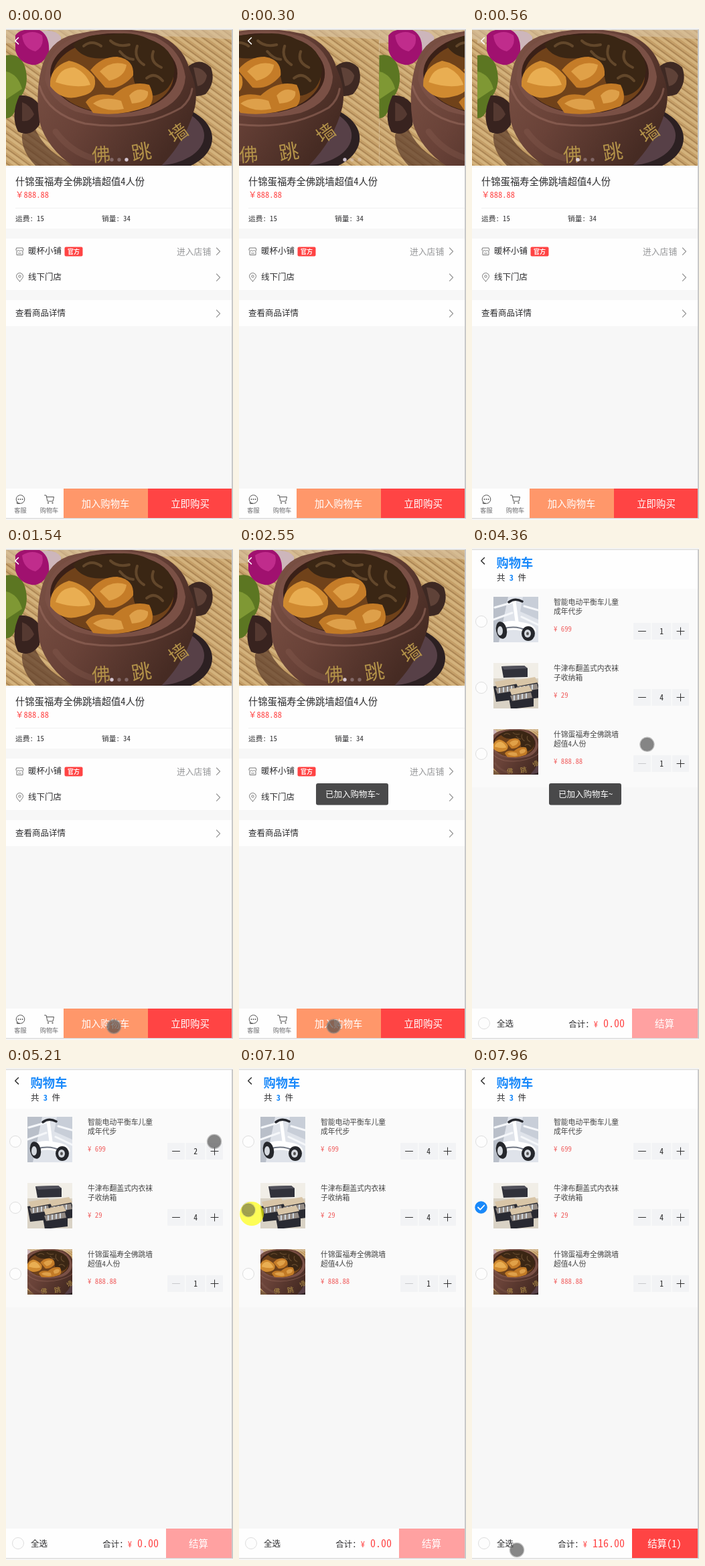
Recreate the animation shown at these times as an HTML page. Size 339 by 736 pixels, loop 8 s.

```html
<!DOCTYPE html>
<html lang="zh-CN">
<head>
<meta charset="utf-8">
<title>Shop</title>
<style>
html, body { margin: 0; width: 100%; height: 100%; overflow: hidden; background: #f7f7f7; }
svg { display: block; }
#stage { width: 100vw; height: 100vh; }
text { font-family: "Noto Sans Mono CJK SC", "Noto Sans CJK SC", "Noto Sans CJK", sans-serif; white-space: pre; }
</style>
</head>
<body>
<svg id="stage" viewBox="0 0 339 736" xmlns="http://www.w3.org/2000/svg"></svg>
<script>
const LOOP = 8000;
const RED = '#ff4444', BLUE = '#1989fa', INK = '#2c2c2e';

// Markup helpers; text is placed by its vertical centre.
const rect = (x, y, w, h, fill, more = '') =>
  `<rect x="${x}" y="${y}" width="${w}" height="${h}" fill="${fill}" ${more}/>`;
const oval = (x, y, rx, ry, fill, more = '') =>
  `<ellipse cx="${x}" cy="${y}" rx="${rx}" ry="${ry}" fill="${fill}" ${more}/>`;
const path = (d, fill, more = '') => `<path d="${d}" fill="${fill}" ${more}/>`;
const line = (d, color, width = 1, more = '') =>
  `<path d="${d}" fill="none" stroke="${color}" stroke-width="${width}" stroke-linecap="round" stroke-linejoin="round" ${more}/>`;
const label = (x, cy, size, fill, str, more = '') =>
  `<text x="${x}" y="${cy + size * 0.38}" font-size="${size}" fill="${fill}" ${more}>${str}</text>`;
const mid = 'text-anchor="middle"';
const chevron = y => line(`M314.5 ${y - 5}l5 5.2l-5 5.2`, '#9b9b9b', 1.3);
const back = color => line('M18.5 14.5l-4.8 4.7l4.8 4.7', color, 1.5);
const tick = (x, y) => `<circle cx="${x}" cy="${y}" r="8.5" fill="#fdfdfd" stroke="#dedede"/>`;

const potArt = () => `
  ${rect(0, 0, 337, 203, '#c59f68')}${rect(0, 0, 337, 203, 'url(#mat)')}
  ${path('M0 0H337V14Q180 2 0 20Z', '#d9c4a4', 'opacity=".6"')}
  ${path('M40 140Q60 190 110 203H44Q22 180 24 156Z', '#5a3a28', 'opacity=".7"')}
  ${path('M0 38Q20 34 28 54Q36 80 22 100Q12 134 0 132Z', '#5c7622')}
  ${path('M0 62Q18 66 24 88L0 104Z', '#7f9834')}
  ${path('M48 2Q74 -2 82 10Q84 32 70 42Q54 26 48 2Z', '#cdb6bb')}
  ${path('M14 8Q22 -4 50 0Q66 8 64 34Q54 54 38 52Q18 48 14 30Z', '#a0116f')}
  ${path('M24 8Q40 -2 54 8Q58 24 44 32Q26 28 24 8Z', '#c02c8c')}
  ${oval(225, 162, 83, 52, '#2c2022')}${oval(222, 158, 74, 45, '#574047')}
  ${path('M20 98Q38 96 50 112V142Q36 162 18 152Q6 128 20 98Z', '#38231f')}
  ${path('M24 108q12 4 18 18q-6 12-18 10z', '#553931')}
  ${path('M268 58Q288 38 306 56Q314 78 298 96Q278 104 270 90Z', '#3e2923')}
  ${path('M280 56q14 0 20 12q-2 14-14 16z', '#5f4238')}
  ${path('M52 62Q62 14 105 6Q165 -8 225 6Q264 22 274 58Q288 90 282 116Q270 164 232 203H100Q62 178 50 138Q44 96 52 62Z', 'url(#clay)')}
  ${path('M58 74Q60 30 100 12Q164 -8 222 10Q262 28 268 70Q266 108 220 124Q160 138 104 122Q66 106 58 74Z', '#7a5045')}
  ${oval(161, 65, 95, 60, '#3a2017')}
  ${oval(160, 69, 90, 55, '#70421a')}
  ${path('M100 22Q122 4 150 8Q188 0 214 14Q250 26 252 60Q248 92 222 98Q194 98 190 70Q176 46 150 42Q114 46 100 22Z', '#3a2614')}
  ${line('M116 24q12-10 26 0M156 16q10 10 28 6M196 24q-6 18 10 28M220 32q-6 16 12 24M210 72q12-10 24 4M170 32q10 12 20 12', '#62472b', 4)}
  ${path('M66 84Q64 56 94 46Q116 50 132 70Q138 94 112 99Q84 108 66 84Z', '#d08a30')}
  ${path('M74 78Q80 56 102 56Q120 64 126 82Q104 88 74 78Z', '#e9ae52')}
  ${path('M126 60Q142 40 166 40Q192 44 190 68Q172 90 148 86Z', '#c57c28')}
  ${path('M140 62Q158 44 180 52Q178 70 154 76Z', '#e0a148')}
  ${path('M119 108Q130 92 160 98Q186 74 214 82Q224 102 214 114Q172 130 130 124Z', '#c27a26')}
  ${path('M130 110Q146 98 172 106L176 118Q150 124 130 110ZM184 98Q196 84 212 92Q214 108 188 110Z', '#dea04a')}
  ${line('M50 84Q62 126 118 140Q200 152 262 116Q276 104 278 88', '#96695c', 3, 'opacity=".6"')}
  ${line('M74 152Q96 182 130 192', '#8c6255', 9, 'opacity=".3"')}
  ${label(128, 186, 28, '#b39249', '佛', 'transform="rotate(-4 142 186)"')}
  ${label(187, 182, 30, '#b39249', '跳', 'transform="rotate(-10 202 182)"')}
  ${label(243, 154, 28, '#b39249', '墙', 'transform="rotate(-36 257 154)"')}`;

const scooterArt = () => `
  ${rect(0, 0, 67, 68, '#dfe3ea')}
  ${path('M0 0H22L8 68H0Z', '#b9bfc9')}${path('M44 0H67V34L40 22Z', '#c8ced8')}
  ${line('M2 16L30 8M0 34L28 24M42 30L67 42M46 14L67 20', '#f5f7fa', 3)}
  ${line('M31 7L36 44', '#fff', 5)}${line('M23 8q9-7 20-1', '#26282e', 3.5)}
  ${path('M4 44Q20 32 42 38Q62 40 64 52L50 54Q32 46 14 52Z', '#fff')}
  ${line('M14 48Q34 42 50 51', '#6f7683', 2)}
  ${oval(12, 50, 8, 13, '#25272c', 'transform="rotate(-12 12 50)"')}${oval(10, 51, 4, 7, '#d5d9df')}
  ${oval(52, 55, 10, 11, '#25272c')}${oval(51, 55, 5, 6, '#d5d9df')}${oval(51, 55, 2, 2.5, '#555')}`;

const openBox = (x, y) => `<g transform="translate(${x} ${y})">
  ${path('M0 9L34 4L38 14V28L4 32Z', '#292a32')}
  ${path('M2 2L31 -3L36 5L5 11Z', '#d8c5a7')}
  ${path('M3 12L34 7L36 15L6 20Z', '#938b85')}
  ${line('M9 12v6M15 11v6M21 10v6M27 9v6', '#d1d8df', 2)}</g>`;

const boxesArt = () => `
  ${rect(0, 0, 67, 68, '#d9d2c5')}${rect(0, 0, 67, 23, '#f1eee7')}
  ${path('M12 5L46 4L51 8V21L15 22Z', '#30313a')}${path('M12 5L46 4L51 8L16 10Z', '#51515b')}
  ${openBox(0, 26)}${openBox(31, 24)}${openBox(22, 37)}`;

const thumb = (y, art, box) =>
  `<svg x="32" y="${y}" width="67" height="68" viewBox="${box}" preserveAspectRatio="xMidYMid slice">${art}</svg>`;

function cartItem(i, lines, price, qty, art, box = '0 0 67 68') {
  const y = 99 * i, key = '#f2f3f5', minus = qty > 1 || i === 0 ? '#323233' : '#c8c9cc';
  return tick(14, 110 + y) + thumb(73 + y, art, box)
    + label(122, 81 + y, 10.8, '#444', lines[0]) + label(122, 95 + y, 10.8, '#444', lines[1])
    + label(122, 121 + y, 10.8, '#f06060', '¥ ' + price, 'font-weight="500"')
    + rect(241, 112 + y, 26, 25, key, 'rx="1"') + rect(268.5, 112 + y, 29, 25, key)
    + rect(299, 112 + y, 25, 25, key, 'rx="1"')
    + line(`M248.5 ${124.5 + y}h11`, minus) + line(`M306 ${124.5 + y}h11m-5.5 -5.5v11`, '#323233')
    + label(283, 125 + y, 11.5, '#222', qty, `${mid} id="qty${i}"`);
}

const shopPage = () => `<g id="shop">
  <g clip-path="url(#banner)">
    <g id="slides"><use href="#pot" y="3"/><use href="#pot" x="337" y="3"/></g>
  </g>
  ${[158, 169, 180].map(x => `<circle class="dot" cx="${x}" cy="197" r="2.7" fill="#ebdfee"/>`).join('')}
  ${back('#fff')}
  ${rect(0, 206, 337, 94, '#fefefe')}${rect(0, 207, 337, 1, '#efefef')}
  ${label(14, 229.5, 14.3, INK, '什锦蛋福寿全佛跳墙超值4人份')}
  ${label(14, 249.3, 12.5, RED, '￥888.88')}
  ${rect(14, 269, 323, 1, '#f0f0f0')}
  ${label(14, 285, 10.7, INK, '运费: 15')}${label(143, 285, 10.7, INK, '销量: 34')}
  ${rect(0, 315, 337, 77, '#fefefe')}${rect(0, 407, 337, 39, '#fefefe')}
  ${line('M16 329h9l1 3.5q-1.5 2.5-3.5 0q-2 2.5-4 0q-2 2.5-3.5 0zM16 334.5v5h9v-5M18.5 337h4', '#777')}
  ${label(33, 333.7, 12.5, INK, '暖杯小铺')}
  ${rect(87.5, 327.5, 27, 14, RED, 'rx="2"')}${label(101, 334.5, 9, '#fff', '官方', mid + ' font-weight="700"')}
  ${label(255, 333.7, 12.8, '#969799', '进入店铺')}${chevron(334)}
  ${line('M20.5 379q-5-5-5-7.5a5 5 0 0 1 10 0q0 2.5-5 7.5z', '#777')}
  <circle cx="20.5" cy="371.5" r="1.7" fill="none" stroke="#777"/>
  ${label(33, 372.7, 12.5, INK, '线下门店')}${chevron(373)}
  ${label(14, 426.7, 12.5, INK, '查看商品详情')}${chevron(427)}
  ${rect(0, 689, 86, 44, '#fefefe')}
  <circle cx="21.5" cy="705" r="6.3" fill="none" stroke="#555"/>
  ${line('M16.5 709v2.5h4', '#555')}
  ${[18.5, 21.5, 24.5].map(x => oval(x, 705, 0.9, 0.9, '#555')).join('')}
  ${line('M57.5 699h2.5l2 9h8l1.5-6.5h-10.5', '#555')}
  ${oval(63, 710.5, 1.1, 1.1, '#555')}${oval(69.5, 710.5, 1.1, 1.1, '#555')}
  ${label(21.5, 721.7, 9.2, '#6b6b6e', '客服', mid)}${label(64.5, 721.7, 9.2, '#6b6b6e', '购物车', mid)}
  ${rect(86, 689, 126, 44, '#ff976a', 'id="add"')}${rect(212, 689, 125, 44, RED)}
  ${label(148.5, 711.5, 14.3, '#fff', '加入购物车', mid)}${label(275, 711.5, 14.4, '#fff', '立即购买', mid)}
</g>`;

const cartPage = () => `<g id="cart">
  ${rect(0, 3, 337, 58, '#fefefe')}${back('#333')}
  ${label(36.5, 22.5, 18.3, BLUE, '购物车', 'font-weight="700"')}
  ${label(37, 44.5, 12.5, INK, '共')}${label(58.8, 44.5, 12.5, BLUE, '0', mid + ' font-weight="700" id="count"')}
  ${label(68.5, 44.5, 12.5, INK, '件')}
  <g id="list">
    ${rect(0, 61, 337, 297, '#fafafa')}
    ${cartItem(0, ['智能电动平衡车儿童', '成年代步'], '699', 1, scooterArt())}
    ${cartItem(1, ['牛津布翻盖式内衣袜', '子收纳箱'], '29', 4, boxesArt())}
    ${cartItem(2, ['什锦蛋福寿全佛跳墙', '超值4人份'], '888.88', 1, '<use href="#pot"/>', '0 0 337 203')}
    <g id="checked"><circle cx="13.5" cy="208.5" r="9.2" fill="${BLUE}"/>${line('M9 208.5l3.3 3.3l6-6.3', '#fff', 1.8)}</g>
  </g>
  ${rect(0, 689, 239, 44, '#fefefe')}${tick(18, 711)}
  ${label(37, 711, 12.5, INK, '全选')}
  <text x="228" y="717" text-anchor="end" font-size="12.5" fill="${INK}">合计：<tspan fill="${RED}">¥</tspan><tspan id="total" fill="${RED}" font-size="16" font-weight="300"></tspan></text>
  ${rect(239, 689, 98, 44, RED, 'id="payBox"')}${label(287.5, 711.5, 14.5, '#fff', '结算', mid + ' id="pay"')}
</g>`;

const stage = document.getElementById('stage');
stage.innerHTML = `
  <defs>
    <pattern id="mat" width="40" height="9" patternUnits="userSpaceOnUse" patternTransform="rotate(36)">
      ${rect(0, 0, 40, 4, '#d3b27c')}${rect(0, 7, 40, 1.5, '#a58050')}
    </pattern>
    <linearGradient id="clay" x1="0" y1="0" x2="1" y2=".6">
      <stop stop-color="#7d5346"/><stop offset=".5" stop-color="#694238"/><stop offset="1" stop-color="#462b23"/>
    </linearGradient>
    <clipPath id="banner">${rect(0, 3, 337, 203, '#000')}</clipPath>
    <clipPath id="photo">${rect(0, 0, 337, 203, '#000')}</clipPath>
    <g id="pot" clip-path="url(#photo)">${potArt()}</g>
  </defs>
  ${rect(0, 0, 339, 736, '#f7f7f7')}
  ${shopPage()}${cartPage()}
  ${rect(0, 0, 339, 2, '#f2f2f2')}${rect(0, 2, 338, 1, '#d8d8d8')}
  ${rect(337, 2, 2, 732, '#c9c9c9')}
  ${rect(0, 733, 338, 1, '#d4d4d4')}${rect(0, 734, 339, 2, '#f5f5f5')}
  <g id="status">${rect(-1, 730.5, 111.5, 8, '#fff', 'stroke="#c4c4c4"')}</g>
  <g id="toast">${rect(115, 352, 108, 32.5, '#323233', 'rx="3" fill-opacity=".88"')}
    ${label(129, 368, 12.5, '#fff', '已加入购物车~')}</g>
  <g id="cursor">
    <circle id="halo" cx="5" cy="5.5" fill="#ffff00" fill-opacity=".65"/>
    <circle id="disc" r="10" fill="#464646" stroke="#828282" stroke-width="2.5"/>
  </g>`;

const el = Object.fromEntries([...stage.querySelectorAll('[id]')].map(n => [n.id, n]));
const dots = [...stage.querySelectorAll('.dot')];
const show = (node, on) => node.setAttribute('visibility', on ? 'inherit' : 'hidden');
const put = (node, str) => { if (node.textContent !== str) node.textContent = str; };
const within = (t, a, b) => t >= a && t < b;

// Progress that jumps n times, first at a and last at b.
const steps = (t, a, b, n) => t < a ? 0 : Math.min(1, (Math.floor((t - a) / (b - a) * (n - 1) + 1e-6) + 1) / n);
const glide = p => p * p * (3 - 2 * p);

// Pointer moves: start, end, steps, from, to.
const moves = [
  [2400, 2860, 7, [161, 716], [62, 714]],
  [3800, 4590, 11, [62, 714], [306, 200]],
  [4670, 4900, 4, [306, 200], [316, 183]],
  [5210, 5211, 2, [311, 110], [311, 110]],
  [5470, 5471, 2, [311, 110], [310, 119.5]],
  [6000, 6500, 7, [310, 119.5], [11, 135]],
  [6720, 7100, 6, [14, 219.5], [14, 212.5]],
  [7560, 7960, 6, [14, 212.5], [67, 721]]
];

function pointerAt(t) {
  const [a, b, n, from, to] = moves.filter(m => t >= m[0]).pop() || moves[0];
  const p = glide(steps(t, a, b, n));
  return from.map((v, i) => v + (to[i] - v) * p);
}

function haloSize(t) {
  if (within(t, 840, 1240)) return 16.5;
  return within(t, 1240, 1390) || within(t, 5470, 6000) || within(t, 6720, 7410) ? 18 : 0;
}

function draw(t) {
  const inCart = t >= 3180, filled = t >= 3875, paid = t >= 7410;
  show(el.shop, !inCart);
  show(el.cart, inCart);

  const k = steps(t, 150, 690, 8);
  const shift = 337 * (1 - (1 - k ** 1.5) ** 3.57);
  el.slides.setAttribute('transform', `translate(${-shift} 0)`);
  const active = t < 150 ? 2 : 0;
  dots.forEach((d, i) => d.setAttribute('opacity', i === active ? 0.85 : 0.3));
  el.add.setAttribute('fill', within(t, 1390, 1540) ? '#e6885f' : '#ff976a');

  el.toast.setAttribute('opacity', steps(t, 1770, 2010, 4) - steps(t, 4670, 4980, 5));
  show(el.status, within(t, 3180, 3800));

  show(el.list, inCart && filled);
  show(el.checked, inCart && t >= 7250);
  put(el.count, filled ? '3' : '0');
  put(el.qty0, String(1 + [5210, 5550, 5840].filter(c => t >= c).length));
  put(el.total, paid ? ' 116.00' : ' 0.00');
  put(el.pay, paid ? '结算(1)' : '结算');
  el.payBox.setAttribute('fill', paid ? RED : '#ffa1a1');

  const r = haloSize(t);
  show(el.cursor, within(t, 840, 4980) || within(t, 5210, 6580) || t >= 6720);
  el.cursor.setAttribute('transform', `translate(${pointerAt(t)})`);
  el.halo.setAttribute('r', r);
  el.disc.setAttribute('fill-opacity', r ? 0.5 : 0.65);
  el.disc.setAttribute('stroke-opacity', r ? 0.15 : 0.5);
}

const start = performance.now();
function frame(now) {
  draw(Math.max(0, now - start) % LOOP);
  requestAnimationFrame(frame);
}
draw(0);
requestAnimationFrame(frame);
</script>
</body>
</html>
```
